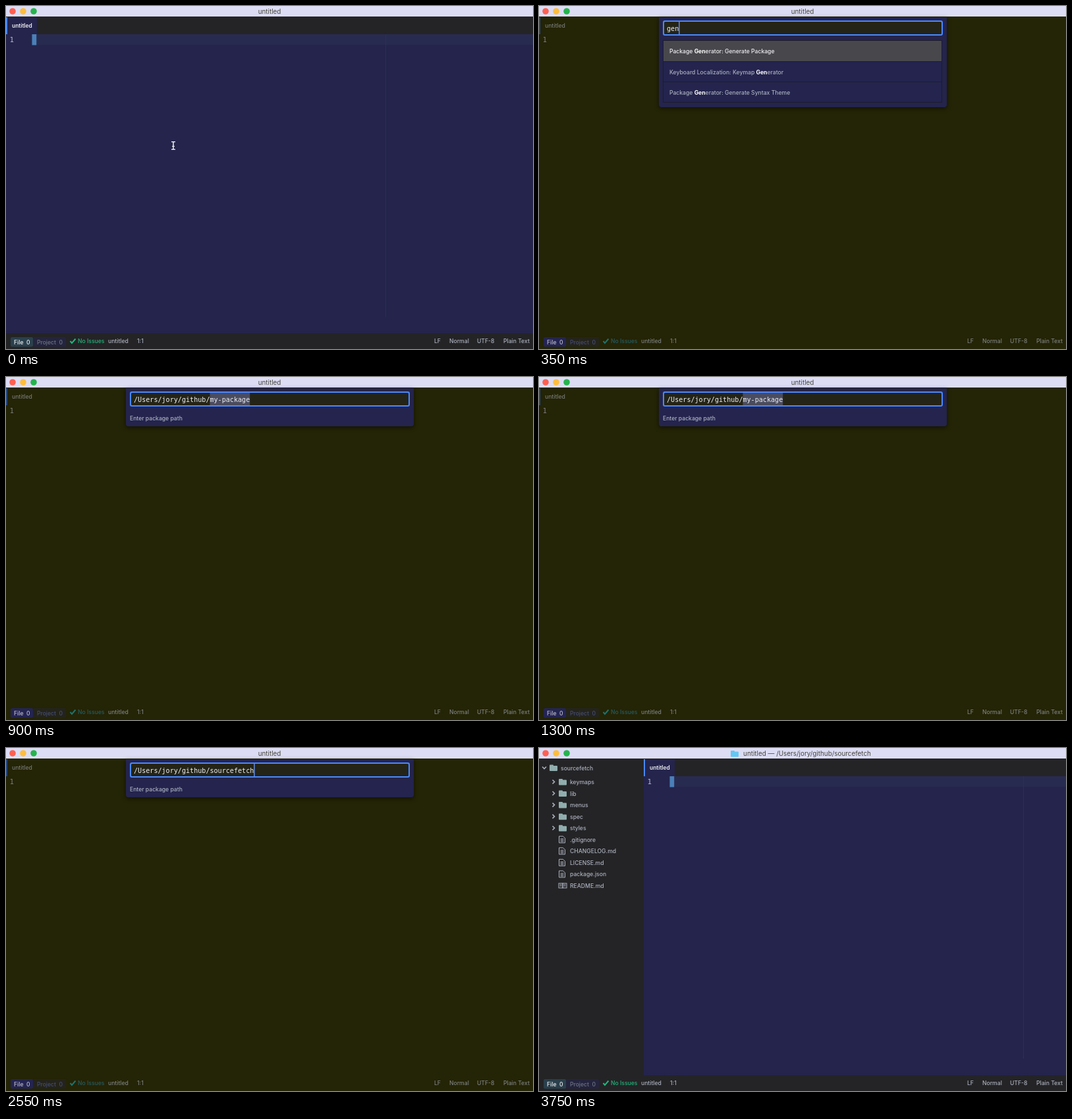
Recreate the animation shown at these times as an HTML page with a canvas. Size 800 px wide and 522 px high, loop 3.8 s.

```html
<!DOCTYPE html>
<html lang="en">
<head>
<meta charset="utf-8">
<title>Package generator</title>
<style>
html, body { margin: 0; width: 100%; height: 100%; overflow: hidden; background: #24244c; }
canvas { display: block; }
</style>
</head>
<body>
<canvas id="stage" width="800" height="522"></canvas>
<script>
const ctx = document.getElementById('stage').getContext('2d');
const LOOP = 3800, TICK = 50;
const SANS = 'Inter, "DejaVu Sans", sans-serif';
const MONO = '"DejaVu Sans Mono", monospace';
const COLOR = {
  editor: '#24244c', chrome: '#242426', panel: '#24244e', dim: '#242406',
  line: '#282b50', accent: '#4a88ff', text: '#abb0be', bright: '#f0f0f4',
  green: '#22b57c', key: '#47474f', icon: '#91adad'
};
const COMMANDS = [
  ['About: View Release Notes'],
  ['Application: About'],
  ['Application: Add Project Folder', '⇧⌘O', 36],
  ['Application: Bring All Windows To Front'],
  ['Application: Hide', '⌘H', 26],
  ['Application: Hide Other Applications', '⌥⌘H', 36],
  ['Application: Install Update'],
  ['Application: Minimize', '⌘M', 27]
];
const MATCHES = [
  ['Package Generator: Generate Package'],
  ['Keyboard Localization: Keymap Generator'],
  ['Package Generator: Generate Syntax Theme']
];
const ROOT = '/Users/jory/github/';
const PROJECT = 'sourcefetch';
const FOLDERS = ['keymaps', 'lib', 'menus', 'spec', 'styles'];
const FILES = ['.gitignore', 'CHANGELOG.md', 'LICENSE.md', 'package.json', 'README.md'];
const TIME = { palette: 50, query: 150, prompt: 650, path: 1340, close: 2600, tree: 2650 };
const KEY_STEP = 70, BLINK = 800;

function rect(x, y, w, h, color) {
  ctx.fillStyle = color;
  ctx.fillRect(x, y, w, h);
}

function round(x, y, w, h, r, color) {
  ctx.fillStyle = color;
  ctx.beginPath();
  ctx.roundRect(x, y, w, h, r);
  ctx.fill();
}

function dot(x, y, r, color) {
  ctx.fillStyle = color;
  ctx.beginPath();
  ctx.arc(x, y, r, 0, 2 * Math.PI);
  ctx.fill();
}

function stroke(points, color, width) {
  ctx.strokeStyle = color;
  ctx.lineWidth = width;
  ctx.beginPath();
  points.forEach(([x, y]) => ctx.lineTo(x, y));
  ctx.stroke();
}

// Draws text by its middle line and returns the x where it ends.
function text(str, x, y, color = COLOR.text, weight = 500, size = 8.6, family = SANS) {
  ctx.font = `${weight} ${size}px ${family}`;
  ctx.fillStyle = color;
  ctx.fillText(str, x, y + size * 0.36);
  return x + ctx.measureText(str).width;
}

const mono = (str, x, y, color, size = 10.1) => text(str, x, y, color, 400, size, MONO);

function folder(x, y, color) {
  round(x, y - 4.5, 6, 4, 1, color);
  round(x, y - 3, 12, 8, 1, color);
}

function chevron(x, y, down) {
  stroke(down ? [[x - 3, y - 1.5], [x, y + 1.5], [x + 3, y - 1.5]]
              : [[x - 1.5, y - 3], [x + 1.5, y], [x - 1.5, y + 3]], COLOR.text, 1.6);
}

function fileIcon(x, y) {
  stroke([[x, y - 5], [x + 6, y - 5], [x + 9, y - 2], [x + 9, y + 5], [x, y + 5], [x, y - 5]], COLOR.text, 1);
  [-1, 1, 3].forEach(dy => stroke([[x + 2, y + dy], [x + 7, y + dy]], COLOR.text, 1));
}

function bookIcon(x, y) {
  ctx.strokeStyle = COLOR.text;
  ctx.lineWidth = 1;
  ctx.strokeRect(x, y - 3.5, 6, 7);
  ctx.strokeRect(x + 6, y - 3.5, 6, 7);
  [-1.5, 0.5].forEach(dy => {
    stroke([[x + 1.5, y + dy], [x + 4.5, y + dy]], COLOR.text, 1);
    stroke([[x + 7.5, y + dy], [x + 10.5, y + dy]], COLOR.text, 1);
  });
}

function titleBar(hasProject) {
  rect(0, 0, 800, 16, '#dcdcf4');
  ['#ff5f50', '#ffbd3c', '#24b44c'].forEach((c, i) => dot(10 + i * 16, 8, 4.8, c));
  if (hasProject) folder(291, 8.5, '#62c8f4');
  const title = hasProject ? `untitled — ${ROOT}${PROJECT}` : 'untitled';
  ctx.textAlign = 'center';
  text(title, hasProject ? 407 : 400, 8.5, '#44443c', 400, 9.9);
  ctx.textAlign = 'left';
}

function editor(left, dim, cursorOn) {
  rect(0, 16, 800, 506, COLOR.editor);
  rect(0, 16, 800, 27, COLOR.chrome);
  rect(left, 17, 47, 26, COLOR.editor);
  rect(left + 39, 43, 761, 16, COLOR.line);
  rect(left + 576, 43, 1, 430, '#24344e');
  rect(0, 498, 800, 24, COLOR.chrome);
  if (left) rect(0, 16, left, 482, COLOR.chrome);
  ctx.globalAlpha = dim;
  rect(0, 16, 800, 506, COLOR.dim);
  ctx.globalAlpha = 1;
  if (cursorOn) rect(left + 39.5, 43, 6.7, 16.5, '#4a80b8');
  rect(left, 17, 2, 26, dim ? '#284a82' : COLOR.accent);
  ctx.globalAlpha = 1 - 0.4 * dim;
  text('untitled', left + 9, 30, dim ? COLOR.text : COLOR.bright, dim ? 500 : 600, dim ? 8.6 : 8.4);
  mono('1', left + 5.5, 51, '#b4b8c8', 10.8);
  ctx.globalAlpha = 1;
}

function statusBar(dim) {
  const y = 510;
  round(41, 504, 50, 14.5, 2, dim ? '#24241c' : '#24243e');
  round(7, 504, 34, 14.5, 2, dim ? '#242452' : '#2a404c');
  ctx.globalAlpha = 1 - 0.25 * dim;
  text('File  0', 12, 511.5, COLOR.bright);
  text('Project  0', 47, 511.5, dim ? '#505a8c' : '#6e7484');
  stroke([[97.5, 510], [100, 513], [105.5, 506.5]], dim ? '#1c8c90' : COLOR.green, 2);
  text('No Issues', 109, y, dim ? '#247080' : COLOR.green);
  ctx.globalAlpha = 1 - 0.35 * dim;
  text('untitled', 155, y);
  text('1:1', 199, y);
  text('LF', 650, y);
  text('Normal', 673, y);
  text('UTF-8', 715, y);
  text('Plain Text', 755, y);
  ctx.globalAlpha = 1;
}

function tree() {
  const rowY = i => 51.5 + i * 17.55;
  chevron(8, 30, true);
  folder(16, 30, COLOR.icon);
  text(PROJECT, 33, 30.5);
  FOLDERS.forEach((name, i) => {
    chevron(22, rowY(i), false);
    folder(30, rowY(i), COLOR.icon);
    text(name, 47, rowY(i) + 0.5);
  });
  FILES.forEach((name, i) => {
    const y = rowY(i + FOLDERS.length);
    if (name === 'README.md') bookIcon(30, y);
    else fileIcon(30.5, y);
    text(name, 47, y + 0.5);
  });
}

function panel(bottom, value, selected = '') {
  ctx.save();
  ctx.shadowColor = 'rgba(0,0,0,.5)';
  ctx.shadowBlur = 6;
  ctx.shadowOffsetY = 2;
  round(182, 17, 437, bottom - 17, [0, 0, 4, 4], COLOR.panel);
  ctx.restore();
  round(188, 22, 425, 23, 3, COLOR.accent);
  round(190, 24, 421, 19, 1.5, '#242418');
  const end = mono(value, 194, 34, COLOR.bright);
  if (selected) {
    rect(end, 24, ctx.measureText(selected).width, 19, '#4a4c60');
    mono(selected, end, 34, COLOR.bright);
  } else {
    rect(end, 24, 1.3, 19, '#6c9cff');
  }
}

function keyHint(keys, width, y) {
  round(599 - width, y - 10, width, 20, 2.5, COLOR.key);
  ctx.textAlign = 'center';
  text([...keys].join('\u200a'), 599 - width / 2, y + 0.5, '#b4b4bc', 400, 8.8);
  ctx.textAlign = 'left';
}

function commandText(label, query, y, active) {
  const color = active ? COLOR.bright : COLOR.text;
  const at = query ? label.toLowerCase().indexOf(query) : -1;
  if (at < 0) return text(label, 198, y, color);
  const stop = at + query.length;
  let x = text(label.slice(0, at), 198, y, color);
  x = text(label.slice(at, stop), x, y, '#fff', 700);
  text(label.slice(stop), x, y, color);
}

function palette(query) {
  const filtered = query.length > 2;
  const rows = filtered ? MATCHES : COMMANDS;
  const bottom = filtered ? 154 : 308;
  const right = filtered ? 611 : 603;
  panel(bottom, query);
  ctx.save();
  ctx.beginPath();
  ctx.rect(188, 53, 424, bottom - 60.5);
  ctx.clip();
  rows.forEach(([label, keys, width], i) => {
    const y = 69 + i * 31.45;
    if (i === 0) rect(189, 53, right - 189, 31, '#48484c');
    rect(189, Math.round(y + 15), right - 189, 1, '#1c1c30');
    commandText(label, filtered ? query : '', y, i === 0);
    if (keys) keyHint(keys, width, y);
  });
  if (!filtered) {
    rect(603, 53, 8, 248, '#24243a');
    round(606.5, 55, 3, 8, 1.5, '#50505c');
  }
  ctx.restore();
  ctx.strokeStyle = '#1c1c28';
  ctx.lineWidth = 1;
  ctx.strokeRect(188.5, 52.5, 423, bottom - 60);
}

function pointer(t) {
  if (t < TIME.palette) {
    stroke([[254, 207], [254, 218]], '#fff', 1.4);
    [206.7, 218.3].forEach(y => stroke([[251, y], [257, y]], '#fff', 1.2));
    stroke([[252, 213.5], [256, 213.5]], '#fff', 1);
  } else if (t < TIME.query) {
    ctx.beginPath();
    [[254, 210], [254, 223], [257, 220.3], [259.2, 225], [261.2, 224], [259, 219.6], [262.5, 219.4]]
      .forEach(([x, y]) => ctx.lineTo(x, y));
    ctx.closePath();
    ctx.fillStyle = '#18181c';
    ctx.strokeStyle = '#fff';
    ctx.lineWidth = 1.1;
    ctx.fill();
    ctx.stroke();
  }
}

function typed(word, t, start) {
  return word.slice(0, Math.max(0, Math.floor((t - start) / KEY_STEP) + 1));
}

// The backdrop fades in afresh, easing out, each time a panel opens.
function backdrop(t, opened) {
  const left = 1 - Math.min(1, (t - opened + TICK) / 150);
  return 1 - left * left;
}

function draw(t) {
  const inPalette = t >= TIME.palette && t < TIME.prompt;
  const inPrompt = t >= TIME.prompt && t < TIME.close;
  const dim = inPalette ? backdrop(t, TIME.palette) : inPrompt ? backdrop(t, TIME.prompt) : 0;
  const hasProject = t >= TIME.tree;
  const cursorOn = t < TIME.palette ||
    (t >= TIME.close && (t - TIME.close) % BLINK < BLINK / 2);

  editor(hasProject ? 159 : 0, dim, cursorOn);
  titleBar(hasProject);
  statusBar(dim);
  if (hasProject) tree();
  if (inPalette) palette(typed('genera', t, TIME.query));
  if (inPrompt) {
    panel(75, ROOT + typed(PROJECT, t, TIME.path), t < TIME.path ? 'my-package' : '');
    text('Enter package path', 188, 63);
  }
  pointer(t);
}

let start;
function frame(now) {
  start ??= now;
  draw(Math.floor(((now - start) % LOOP) / TICK) * TICK);
  requestAnimationFrame(frame);
}
draw(0);
requestAnimationFrame(frame);
</script>
</body>
</html>
```
